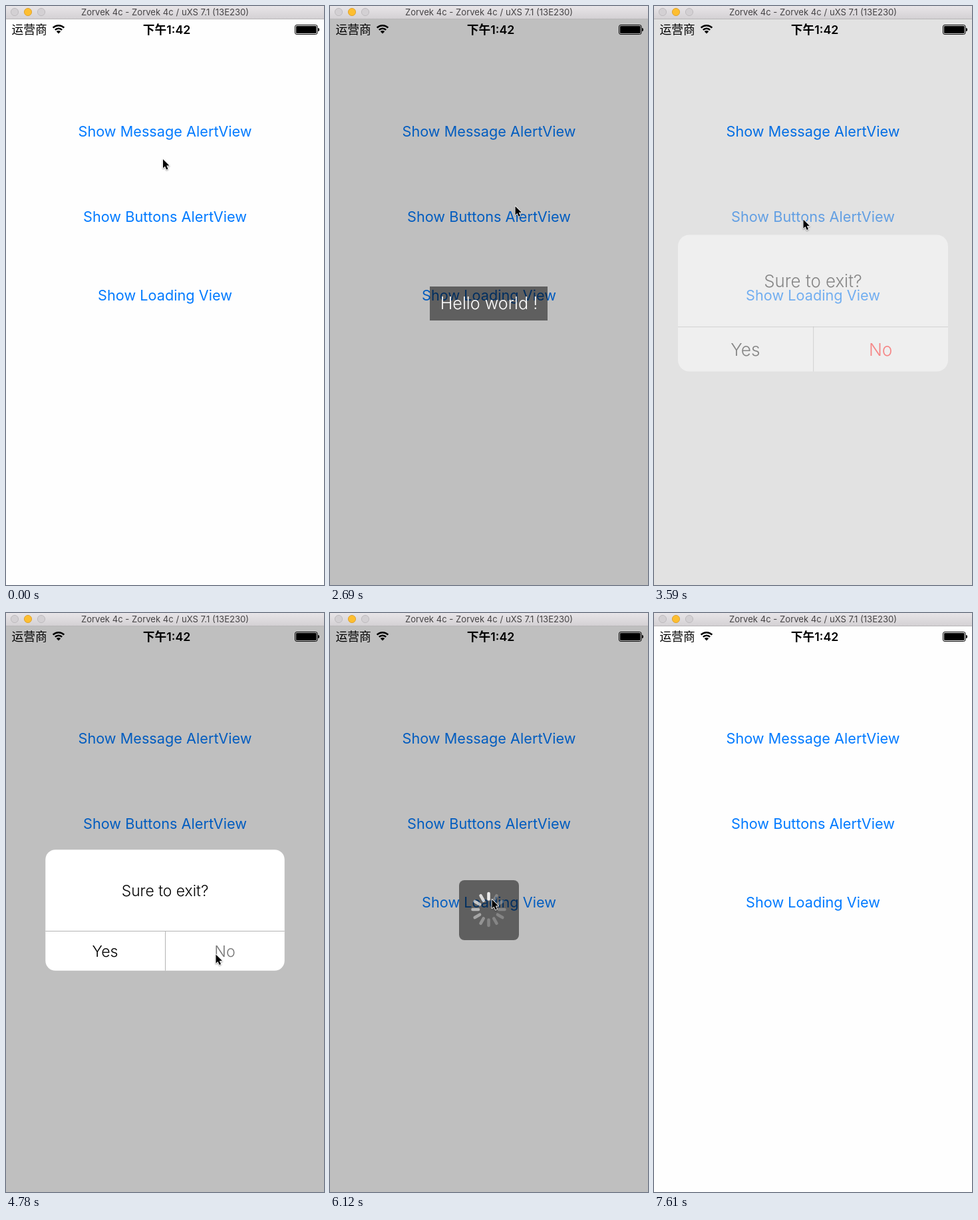
These frames come from a looping animation (478x869 px, 7.89 s). An HTML page with a canvas:

```html
<!DOCTYPE html>
<html lang="en">
<head>
<meta charset="utf-8">
<title>Alert views</title>
<style>
html, body { margin: 0; width: 100%; height: 100%; overflow: hidden; background: #fefefe; }
canvas { display: block; }
</style>
</head>
<body>
<canvas id="stage" width="478" height="869"></canvas>
<script>
const ctx = document.getElementById('stage').getContext('2d');
const LOOP = 7890;
const REFRESH = 148.5;
const FADE = 280;
const FONT = 'Inter, "Noto Sans CJK SC", "Noto Sans CJK", sans-serif';

// Each popup opens when its button is released
const message = { label: 'Show Message AlertView', y: 196, show: 1200, hide: 2710, fade: 2 * FADE };
const dialog = { label: 'Show Buttons AlertView', y: 324, show: 3450, hide: 4800, fade: FADE };
const loading = { label: 'Show Loading View', y: 442, show: 5840, hide: 7180, fade: FADE };
const popups = [message, dialog, loading];

const moves = [
  { leave: 250, arrive: 1150, x: 240, y: 192 },
  { leave: 2480, arrive: 2680, x: 278.5, y: 300.5 },
  { leave: 2690, arrive: 3400, x: 224.5, y: 320.5 },
  { leave: 3730, arrive: 4470, x: 315.5, y: 512.5 },
  { leave: 4930, arrive: 5800, x: 243.5, y: 430 },
  { leave: 7010, arrive: 7600, x: 500, y: 880 }
];

const progress = (t, start, length) => Math.min(1, Math.max(0, (t - start) / length));
const ease = p => p * p * (3 - 2 * p);
const ramp = (t, start, length = FADE) => ease(progress(t, start, length));
const visible = (popup, t, fade = FADE) => ramp(t, popup.show, fade) * (1 - ramp(t, popup.hide));

function cursorAt(t) {
  return moves.reduce(([x, y], move) => {
    const p = ramp(t, move.leave, move.arrive - move.leave);
    return [x + (move.x - x) * p, y + (move.y - y) * p];
  }, [236, 230]);
}

function text(str, x, y, font, color, align = 'center') {
  ctx.font = `${font} ${FONT}`;
  ctx.fillStyle = color;
  ctx.textAlign = align;
  ctx.fillText(str, x, y);
}

function rect(x, y, w, h, color) {
  ctx.fillStyle = color;
  ctx.fillRect(x, y, w, h);
}

function rounded(x, y, w, h, r, color) {
  ctx.beginPath();
  ctx.roundRect(x, y, w, h, r);
  ctx.fillStyle = color;
  ctx.fill();
}

function withAlpha(alpha, paint) {
  if (alpha <= 0) return;
  ctx.save();
  ctx.globalAlpha = alpha;
  paint();
  ctx.restore();
}

function drawTitleBar() {
  const shade = ctx.createLinearGradient(0, 0, 0, 19);
  shade.addColorStop(0, '#e8e5e8');
  shade.addColorStop(1, '#d4d1d4');
  rect(0, 0, 478, 19, shade);
  rect(0, 19, 478, 1, '#b8b6b8');
  ctx.lineWidth = .9;
  for (const x of [13, 33, 53]) {
    ctx.beginPath();
    ctx.arc(x, 9, 5.6, 0, 7);
    ctx.fillStyle = x === 33 ? '#fdbe30' : '#d3d0d3';
    ctx.strokeStyle = x === 33 ? '#dda02a' : '#bbb8bb';
    ctx.fill();
    ctx.stroke();
  }
  text('Zorvek 4c - Zorvek 4c / uXS 7.1 (13E230)', 239, 14, '13.1px', '#454345');
}

function drawStatusBar() {
  text('运营商', 8.5, 42, '17.8px', '#000', 'left');
  text('下午1:42', 241.5, 42, '600 17.8px', '#000');
  ctx.strokeStyle = '#000';
  ctx.lineWidth = 2.5;
  for (const r of [7.3, 11.8]) {
    ctx.beginPath();
    ctx.arc(79, 41, r, -Math.PI * .75, -Math.PI * .25);
    ctx.stroke();
  }
  ctx.beginPath();
  ctx.moveTo(79, 41.5);
  ctx.arc(79, 41.5, 4.6, -Math.PI * .75, -Math.PI * .25);
  ctx.fill();

  ctx.lineWidth = 1;
  ctx.beginPath();
  ctx.roundRect(434.5, 28.5, 33.5, 14, 2.5);
  ctx.stroke();
  rounded(436, 30, 30.5, 11, 1.2, '#000');
  rounded(469, 33, 2, 5, [0, 2, 2, 0], '#000');
}

function drawButton({ label, y, show, fade }, t) {
  const pressed = t >= show - 100;
  const opacity = pressed ? .2 + .8 * progress(t, show, fade) : 1;
  withAlpha(opacity, () => text(label, 239, y, '21.7px', '#007aff'));
}

function drawMessage() {
  rect(150, 421, 177, 51, 'rgba(0,0,0,.5)');
  text('Hello world !', 239, 455, '300 25.2px', '#fff');
}

function drawDialog(t) {
  const scale = 1 + .233 * (1 - ramp(t, dialog.show));
  const noPressed = t >= dialog.hide - 30 && t < dialog.hide;
  ctx.translate(239, 446);
  ctx.scale(scale, scale);
  rounded(-179.7, -90.8, 359.4, 181.6, 15, '#fff');
  rect(-179.7, 31, 359.4, 1, '#b4b4b4');
  rect(0, 31, 1, 59.8, '#b4b4b4');
  text('Sure to exit?', 0, -21.5, '300 22.9px', '#000');
  text('Yes', -90, 70, '300 23.2px', '#000');
  text('No', 90, 70, '300 23.2px', noPressed ? '#777' : '#f00');
}

function drawLoading(t) {
  rounded(194, 401, 90, 90, 8, 'rgba(0,0,0,.5)');
  const lead = Math.floor((t - loading.show) * 12 / 1000) + 9;
  ctx.translate(238.5, 445);
  ctx.lineCap = 'round';
  ctx.lineWidth = 4.6;
  for (let i = 0; i < 12; i++) {
    const age = (lead - i + 12) % 12;
    ctx.strokeStyle = `rgba(255,255,255,${Math.max(.24, .88 - age * .11)})`;
    ctx.save();
    ctx.rotate(i * Math.PI / 6);
    ctx.beginPath();
    ctx.moveTo(0, -15.5);
    ctx.lineTo(0, -24);
    ctx.stroke();
    ctx.restore();
  }
}

const arrow = new Path2D('M0 0V13.2L3 10.4L5.2 15.5L7.5 14.5L5.3 9.6H9.5Z');

function drawCursor([x, y]) {
  ctx.save();
  ctx.translate(x, y);
  ctx.lineJoin = 'round';
  ctx.lineWidth = 1.8;
  ctx.strokeStyle = '#fff';
  ctx.shadowColor = 'rgba(0,0,0,.4)';
  ctx.shadowBlur = 2;
  ctx.shadowOffsetY = 1;
  ctx.stroke(arrow);
  ctx.shadowColor = 'transparent';
  ctx.fillStyle = '#000';
  ctx.fill(arrow);
  ctx.restore();
}

function draw(t) {
  rect(0, 0, 478, 869, '#fefefe');
  popups.forEach(popup => drawButton(popup, t));
  const dim = Math.max(...popups.map(popup => visible(popup, t)));
  rect(0, 20, 478, 849, `rgba(0,0,0,${dim * .25})`);
  withAlpha(visible(message, t, message.fade), drawMessage);
  withAlpha(visible(dialog, t), () => drawDialog(t));
  withAlpha(visible(loading, t), () => drawLoading(t));
  drawTitleBar();
  drawStatusBar();
  drawCursor(cursorAt(t));
}

// The screen refreshes in steps, counted anew after each pause
function stepped(t) {
  const start = [4780, 2540, 0].find(time => time <= t + .5);
  return start + Math.floor((t + .5 - start) / REFRESH) * REFRESH;
}

function play() {
  draw(stepped(performance.now() % LOOP));
  requestAnimationFrame(play);
}
play();
</script>
</body>
</html>
```
